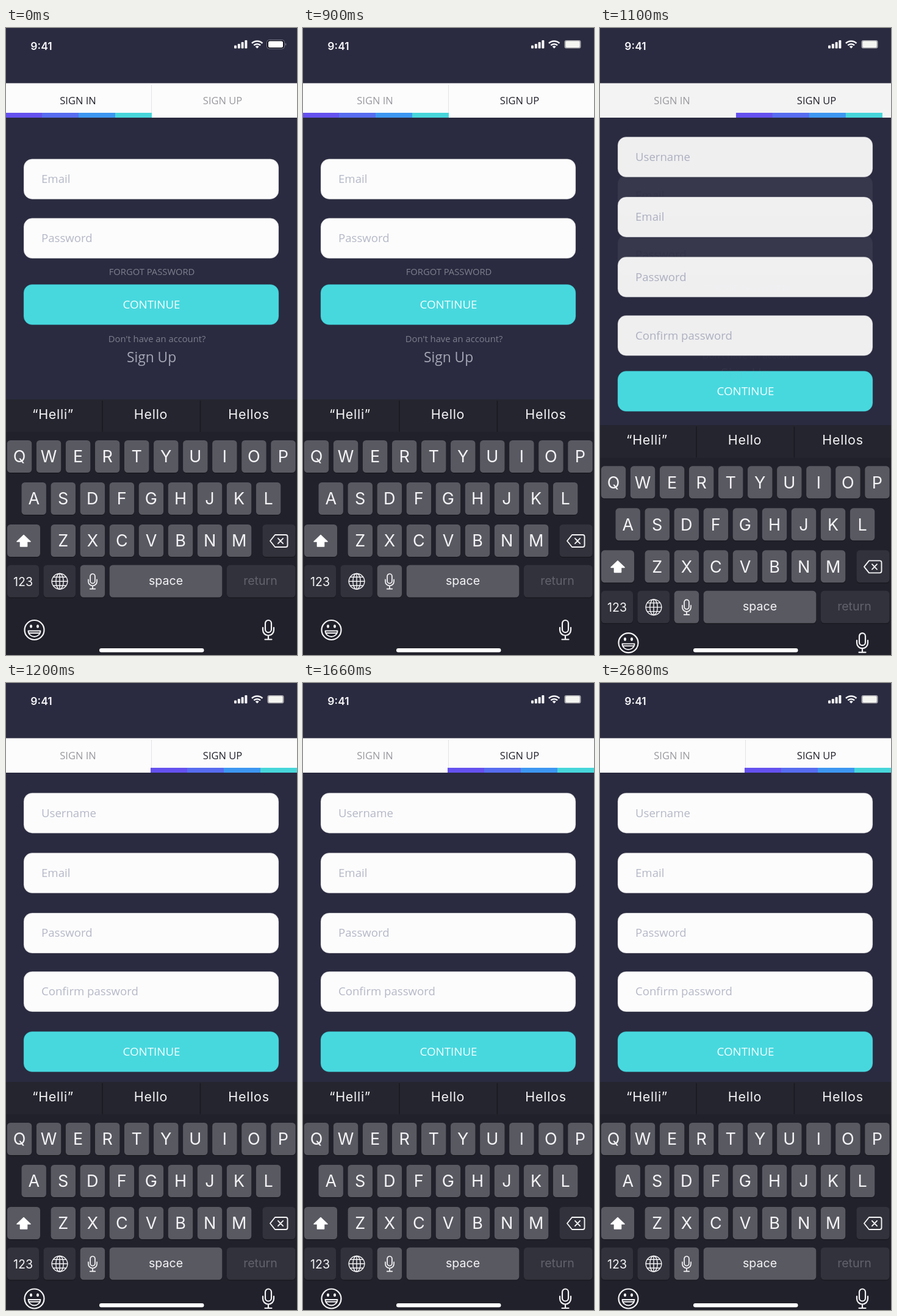
An HTML page for the animation above (3.2 s loop, 477 px wide and 1028 px high).

```html
<!DOCTYPE html>
<html lang="en">
<head>
<meta charset="utf-8">
<title>Sign in / sign up</title>
<style>
html, body { margin: 0; width: 100%; height: 100%; overflow: hidden; background: #2a2b40; }
svg { display: block; width: 477px; height: 1028px; }
text { font-family: "Open Sans", "Noto Sans", sans-serif; white-space: pre; }
.mid { text-anchor: middle; }
.hint { font-size: 18.6px; fill: #b5b8c7; }
.note { font-size: 14.75px; fill: #7e7f8c; }
.tab { font-size: 16.5px; }
.field { fill: #fcfcfc; stroke: #6a6a78; stroke-opacity: .4; }
.ios text { font-family: Inter, Roboto, sans-serif; fill: #f4f4f6; text-anchor: middle; }
.ios .word { font-size: 21.5px; letter-spacing: .7px; }
.ios .letter { font-size: 27px; }
.ios .small { font-size: 19.6px; }
.line { fill: none; stroke: #f4f4f6; stroke-linecap: round; stroke-linejoin: round; }
</style>
</head>
<body>
<svg viewBox="0 0 477 1028">
  <rect width="477" height="1028" fill="#2a2b40"/>

  <g id="status" fill="#f6f6f8">
    <text x="58" y="35.5" class="mid" style="font:600 17.5px Inter,Roboto,sans-serif">9:41</text>
    <rect x="374" y="28.5" width="4" height="5" rx="1"/>
    <rect x="379.8" y="26" width="4" height="7.5" rx="1"/>
    <rect x="385.6" y="23" width="4" height="10.5" rx="1"/>
    <rect x="391.4" y="20" width="4" height="13.5" rx="1"/>
    <g fill="none" stroke="#f6f6f8" stroke-width="2.6">
      <path d="M403 25a12.6 12.6 0 0 1 17.4 0M406.3 28.4a7.8 7.8 0 0 1 10.8 0"/>
    </g>
    <path d="M411.7 33.6l-3-3.1a4.2 4.2 0 0 1 6 0z"/>
    <g id="batteryIn">
      <rect x="427.5" y="19.5" width="29" height="14.5" rx="4" fill="#11121c" stroke="#77788a"/>
      <rect x="430" y="21.5" width="24" height="10.5" rx="2.5" fill="#fff"/>
      <path d="M458 24.5q2.4 2.2 0 4.8z" fill="#8b8c99"/>
    </g>
    <g id="batteryUp">
      <rect x="428.5" y="20" width="27" height="13.5" rx="3" fill="#a5a5ab"/>
      <rect x="430.5" y="21.5" width="23" height="10.5" rx="2" fill="#f5f5f2"/>
    </g>
  </g>

  <rect id="bar" y="90.5" width="477" height="56.5" fill="#fcfcfc"/>
  <path id="divider" d="M238.5 93V139" stroke="#e4e4e6"/>
  <text id="tabIn" x="118" y="125.3" class="mid tab">SIGN IN</text>
  <text id="tabUp" x="355" y="125.3" class="mid tab">SIGN UP</text>
  <g id="underline">
    <rect width="60" y="139" height="8" fill="#6551ef"/>
    <rect x="60" width="60" y="139" height="8" fill="#576cf0"/>
    <rect x="120" width="60" y="139" height="8" fill="#3d97f1"/>
    <rect x="180" width="60" y="139" height="8" fill="#47d6da"/>
  </g>

  <g id="button">
    <rect x="29" y="420.5" width="418" height="66" rx="14" fill="#47d8de" stroke="#2f8f9c" stroke-opacity=".4"/>
    <text x="238.5" y="460" class="mid" font-size="18.8" fill="#f4ffff">CONTINUE</text>
  </g>
  <g id="signIn"></g>
  <g id="signUp"></g>

  <g id="keyboard" class="ios"></g>
  <g id="footer">
    <g class="line" stroke-width="2.2">
      <circle cx="46.5" cy="987" r="16"/>
      <path d="M36.5 988.5h20a10 9.5 0 0 1 -20 0zM38 992h17" stroke-width="1.8"/>
    </g>
    <g fill="#f4f4f6">
      <ellipse cx="41" cy="981" rx="2" ry="2.8"/>
      <ellipse cx="52" cy="981" rx="2" ry="2.8"/>
    </g>
  </g>
  <rect x="153" y="1017" width="171.5" height="6.5" rx="3.2" fill="#fff"/>
</svg>

<script>
const $ = id => document.getElementById(id);
const add = (id, html) => $(id).insertAdjacentHTML("beforeend", html);
// Markup inserted into an SVG element is parsed in the SVG namespace.
const label = (x, y, cls, text, extra = "") =>
  `<text x="${x}" y="${y}" class="${cls}" ${extra}>${text}</text>`;

const field = (y, hint) =>
  `<rect class="field" x="29" y="${y}" width="418" height="66" rx="14"/>` +
  label(58, y + 39.4, "hint", hint);

const key = (x, y, w, fill = "#595962") =>
  `<rect x="${x}" y="${y + 1.2}" width="${w}" height="53" rx="5.5" fill="#17171e"/>` +
  `<rect x="${x}" y="${y}" width="${w}" height="53" rx="5.5" fill="${fill}"/>`;

const keyRow = (letters, x0, y) => [...letters].map((c, i) => {
  const x = x0 + i * 48.05;
  return key(x, y, 40.4) + label(x + 20.2, y + 36.3, "letter", c);
}).join("");

const mic = (x, y, scale) =>
  `<g class="line" transform="translate(${x} ${y}) scale(${scale})" stroke-width="2.2">
    <rect x="-5" y="0" width="10" height="20" rx="5"/>
    <path d="M-9 12v4a9 9 0 0 0 18 0v-4M0 25v6.5M-5.5 31.5h11"/></g>`;

add("signIn",
  field(214.7, "Email") + field(311.8, "Password") +
  label(239, 404.7, "mid note", "FORGOT PASSWORD") +
  label(247.5, 515, "mid note", "Don't have an account?") +
  label(238.5, 548, "mid", "Sign Up", 'font-size="22.8" fill="#a5a7b4"'));

add("signUp",
  field(180.2, "Username") + field(278.6, "Email") +
  field(377, "Password") + field(473, "Confirm password"));

const DARK = "#32323c";
add("keyboard",
  `<rect y="609" width="477" height="480" fill="#21212b"/>
   <rect y="609" width="477" height="53.5" fill="#25252f"/>
   <path d="M158 611v51M318.5 611v51" stroke="#191920" stroke-width="1.6"/>` +
  label(77, 641, "word", "“Helli”") +
  label(237.5, 641, "word", "Hello") +
  label(398, 641, "word", "Hellos") +
  keyRow("QWERTYUIOP", 1.8, 676) +
  keyRow("ASDFGHJKL", 25.5, 745) +
  keyRow("ZXCVBNM", 73.6, 814) +
  key(2, 814, 54) + key(420.5, 814, 54, DARK) +
  key(2, 880.5, 52, DARK) + key(61.5, 880.5, 52.5, DARK) + key(121.7, 880.5, 40.4) +
  key(169.7, 880.5, 184.6) + key(362, 880.5, 112.5, DARK) +
  `<path d="M29 831.5l11 10.5h-5.5v8h-11v-8h-5.5z" fill="#fff" stroke="#fff" stroke-width="1.6" stroke-linejoin="round"/>
   <g class="line" stroke-width="1.9">
     <path d="M441 831h17.5q3 0 3 3v14q0 3 -3 3h-17.5l-8 -10zM446 836.8l8 8.4M454 836.8l-8 8.4"/>
   </g>
   <g class="line" stroke-width="1.4">
     <circle cx="88" cy="907.3" r="12.8"/>
     <ellipse cx="88" cy="907.3" rx="6.2" ry="12.8"/>
     <path d="M88 894.5v25.6M75.2 907.3h25.6M77.6 900.3h20.8M77.6 914.3h20.8"/>
   </g>` +
  mic(142, 895, .78) +
  label(28, 914.8, "small", "123") +
  label(262, 913, "small", "space") +
  label(417, 912.6, "small", "return", 'style="fill:#62626d"'));

add("footer", mic(430, 971, 1));

// The slide starts at 900 ms and is drawn at ten poses a second.
const LOOP = 3200, START = 900, STEP = 100;
const EASE = [0, .622, .941, 1];
const BAR = ["#fcfcfc", "#f9f9f9", "#f3f3f3", "#fcfcfc"];

const move = (id, x, y) => $(id).setAttribute("transform", `translate(${x} ${y})`);
const show = (id, alpha) => $(id).setAttribute("opacity", alpha);
const tint = (id, color) => $(id).setAttribute("fill", color);

function draw(now) {
  const t = now % LOOP;
  const up = t >= START;
  const step = up ? Math.min(3, Math.floor((t - START) / STEP)) : 0;
  const e = EASE[step];

  show("batteryIn", up ? 0 : 1);
  show("batteryUp", up ? 1 : 0);
  tint("tabIn", up ? "#98989e" : "#20202a");
  tint("tabUp", up ? "#20202a" : "#98989e");
  tint("bar", BAR[step]);
  show("divider", e === 0 || e === 1 ? 1 : 0);

  move("underline", -1 + 238 * e, 0);
  move("button", 0, 151 * e);
  move("signIn", 0, 29 * e);
  show("signIn", 1 - e);
  move("signUp", 0, -29 * (1 - e));
  show("signUp", e);
  move("keyboard", 0, 45 * e);
  move("footer", 0, 22.5 * e);
}

function tick(now) {
  draw(now);
  requestAnimationFrame(tick);
}
draw(0);
requestAnimationFrame(tick);
</script>
</body>
</html>
```
